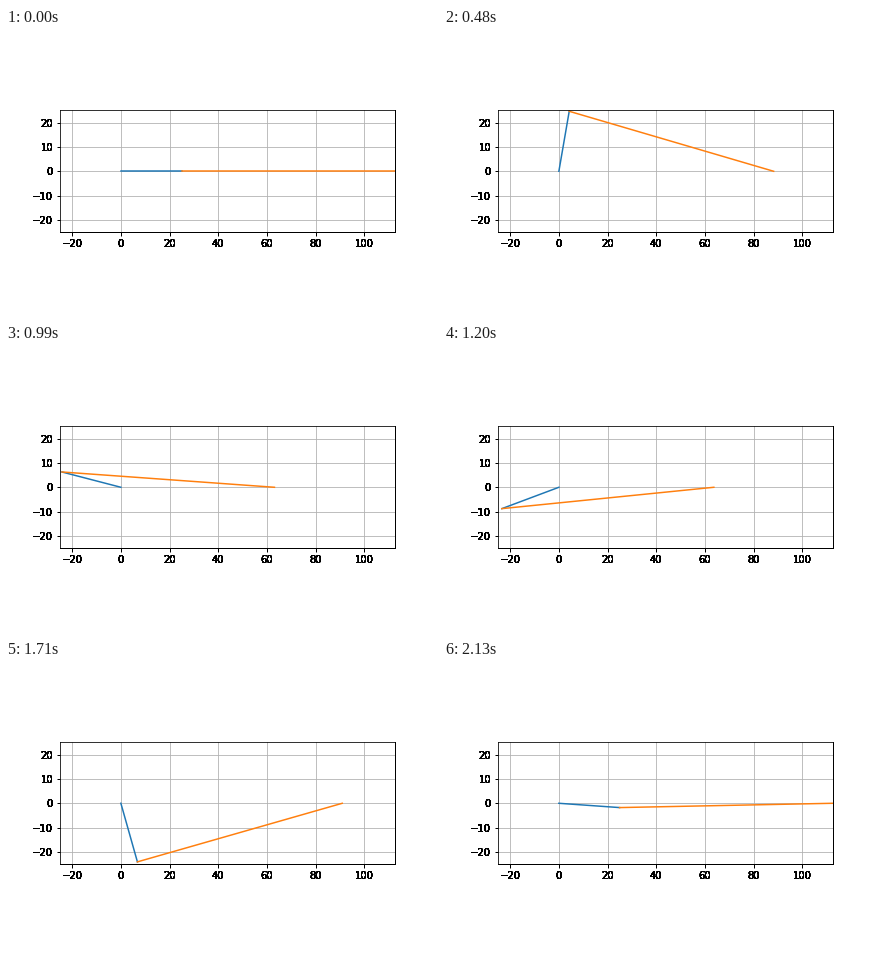
Recreate the animation shown at these times as a matplotlib script. Size 432 by 288 pixels, loop 2.16 s.

```python
import numpy as np
import matplotlib.pyplot as plt
from matplotlib.animation import FuncAnimation

CRANK = 25
ROD = 3.5 * CRANK
STEP = 0.0875
ANGLES = np.arange(0, 2 * np.pi, STEP)
LABEL_PASSES = 16  # overprinting gives the labels their hard black edges

fig = plt.figure(figsize=(6, 4), dpi=72, facecolor="white")
ax = fig.add_axes([0.125, 0.125, 0.775, 0.755])
ax.set_aspect("equal")
ax.set_xlim(-CRANK, CRANK + ROD)
ax.set_ylim(-CRANK, CRANK)
ax.grid(color="#b0b0b0", linewidth=0.8)

x_ticks = range(-20, 101, 20)
y_ticks = range(-20, 21, 10)
ax.set_xticks(x_ticks)
ax.set_yticks(y_ticks)
ax.tick_params(width=1, labelbottom=False, labelleft=False)
for side in ("right", "bottom"):
    ax.spines[side].set_linewidth(1)


def tick_text(x, y, value, placement):
    transform, va, ha = placement
    label = str(value).replace("-", "\u2212")
    for _ in range(LABEL_PASSES):
        ax.text(x, y, label, transform=transform, va=va, ha=ha,
                fontsize=10, family="DejaVu Sans")


for v in x_ticks:
    tick_text(v, 0, v, ax.get_xaxis_text1_transform(7))
for v in y_ticks:
    tick_text(0, v, v, ax.get_yaxis_text1_transform(7))

crank, = ax.plot([], [], color="C0", linewidth=1.5)
rod, = ax.plot([], [], color="C1", linewidth=1.5)


def update(i):
    x = CRANK * np.cos(ANGLES[i])
    y = CRANK * np.sin(ANGLES[i])
    slider = x + np.sqrt(ROD**2 - y**2)
    crank.set_data([0, x], [0, y])
    rod.set_data([x, slider], [y, 0])
    return crank, rod


anim = FuncAnimation(fig, update, frames=len(ANGLES), interval=30,
                     repeat=True, repeat_delay=0)
plt.show()
```
